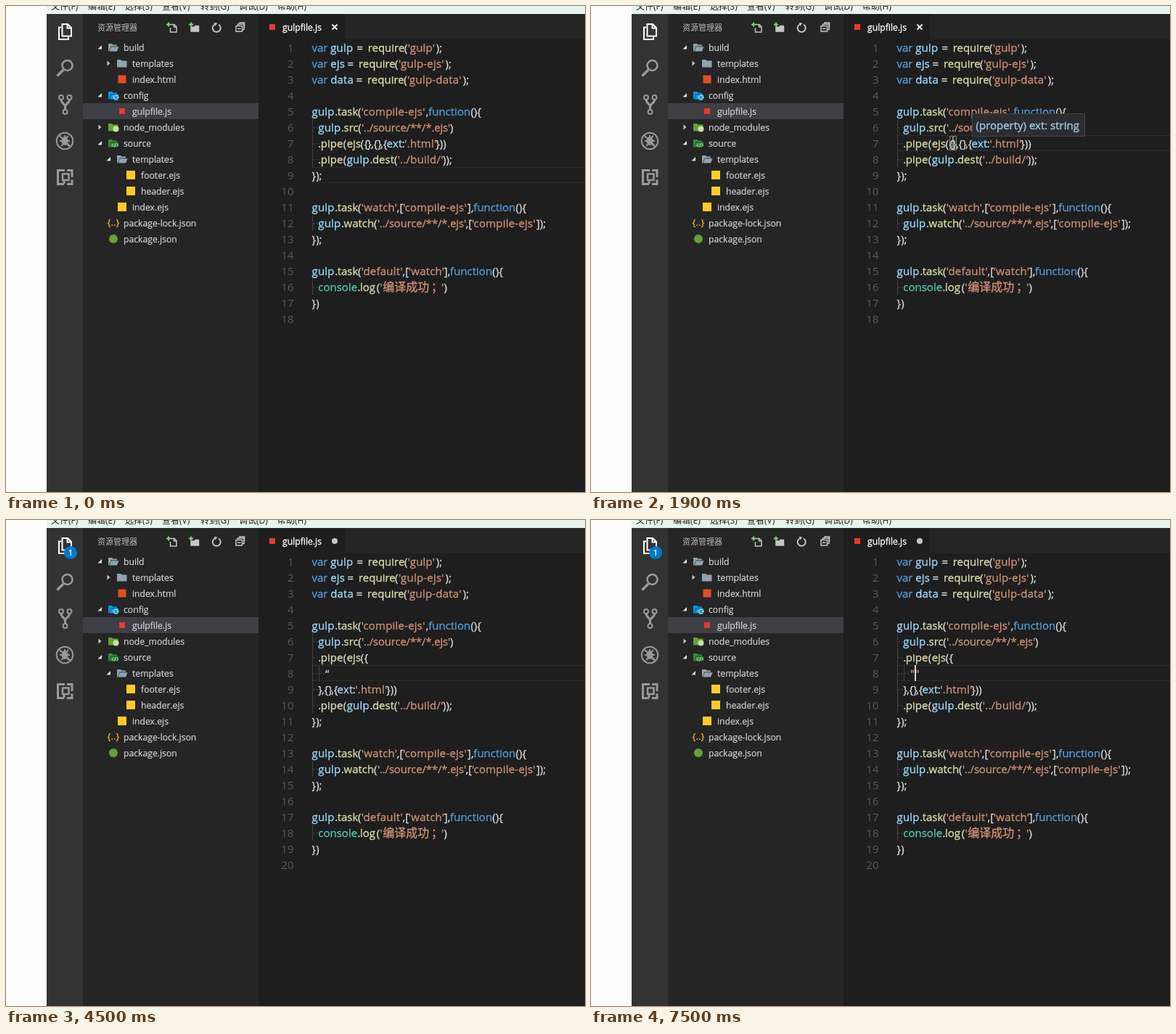
Write an HTML page that moves like this. It is 798 px wide and 670 px high and loops after 8 s.

```html
<!DOCTYPE html>
<html lang="zh-CN">
<head>
<meta charset="utf-8">
<title>Editor</title>
<style>
html, body { margin: 0; width: 100%; height: 100%; overflow: hidden; background: #fdfdfd; }
svg { display: block; font-family: "Open Sans", "Noto Sans CJK SC", "Noto Sans CJK", sans-serif; }
text, tspan { fill: currentColor; stroke: currentColor; stroke-width: .3px; }
.code { font-size: 15px; color: #dadada; }
.k { color: #569cd6; }
.v { color: #9cdcfe; letter-spacing: .2px; }
.f { color: #dcdcaa; }
.s, .g, .z { color: #ce9178; }
.s { letter-spacing: .2px; }
.g { letter-spacing: -.2px; }
.t { color: #4ec9b0; }
.z { font-size: 16px; }
.num { color: #5a5a5a; text-anchor: end; stroke: none; }
.tree { font-size: 12.2px; color: #d4d4d4; }
.tree text { stroke-width: .2px; }
.menu { font-size: 12px; color: #222; }
.menu text, .title { stroke: none; }
.line { fill: none; stroke-width: 2; }

.anim, .before, .after { animation: 8s step-end infinite; }
.before { animation-name: before; }
.after { animation-name: after; }
#highlight { animation-name: highlight; }
#tail { animation-name: tail; }
#options { animation-name: options; }
#brackets { animation-name: brackets; }
#word, #hover { animation-name: hover; }
#badge { animation-name: badge; }
#caret { animation-name: place, blink; }
#open { animation-name: open; }
#close { animation-name: close; }
#pair { animation-name: pair; }
#inner { animation-name: inner; }

@keyframes before { 0% { opacity: 1 } 27.5%, 100% { opacity: 0 } }
@keyframes after { 0% { opacity: 0 } 27.5%, 100% { opacity: 1 } }
@keyframes highlight {
  0% { transform: translateY(222px) }
  6.25% { transform: translateY(178px) }
  27.5%, 100% { transform: translateY(200px) }
}
@keyframes tail { 0% { transform: none } 27.5%, 100% { transform: translateY(44px) } }
@keyframes options { 0% { transform: none } 27.5%, 100% { transform: translate(-68px, 44px) } }
@keyframes brackets { 0%, 27.5%, 100% { opacity: 0 } 7.5% { opacity: 1 } }
@keyframes hover {
  0%, 27.5%, 100% { opacity: 0 }
  15% { opacity: .8 } 16.25% { opacity: .93 } 17.5% { opacity: 1 }
}
@keyframes badge { 0% { opacity: 0 } 30%, 100% { opacity: 1 } }
@keyframes place {
  0% { transform: translate(499px, 178px) }
  27.5%, 60%, 83.75% { transform: translate(440px, 200px) }
  51.25%, 66.25%, 93.75%, 100% { transform: translate(446px, 200px) }
}
@keyframes blink {
  0%, 12.5%, 23.75%, 32.5%, 43.75%, 56.25%, 72.5%, 88.75% { opacity: 0 }
  6.25%, 17.5%, 27.5%, 38.75%, 50%, 60%, 77.5%, 93.75%, 100% { opacity: 1 }
}
@keyframes open { 0%, 60%, 100% { opacity: 0 } 51.25% { opacity: 1 } }
@keyframes close { 0%, 83.75%, 100% { opacity: 0 } 66.25% { opacity: 1 } }
@keyframes pair { 0% { opacity: 0 } 93.75%, 100% { opacity: 1 } }
@keyframes inner {
  0%, 60%, 83.75% { opacity: 0 }
  51.25%, 66.25%, 93.75%, 100% { opacity: 1 }
}
</style>
</head>
<body>
<svg width="798" height="670" viewBox="0 0 798 670">
  <rect width="798" height="670" fill="#fdfdfd"/>
  <rect x="56" width="742" height="11" fill="#e8f4ef"/>
  <g id="menu" class="menu"></g>
  <rect x="56" y="11" width="50" height="659" fill="#333"/>
  <rect x="106" y="11" width="242" height="659" fill="#252526"/>
  <rect x="348" y="11" width="450" height="659" fill="#1e1e1e"/>
  <rect x="467" y="11" width="331" height="35" fill="#252526"/>
  <rect x="106" y="134" width="242" height="22" fill="#3f3f46"/>

  <!-- activity bar -->
  <g class="line" stroke="#fff">
    <path d="M76 29.500H73V46H86V42M77.500 25h7.500l5 5v11.500h-12.500zM84.500 25v5.500h5.500"/>
  </g>
  <g class="line" stroke="#999">
    <circle cx="84.500" cy="82" r="7" stroke-width="2.600"/>
    <path d="M79 88l-8.500 8.500" stroke-width="3.500"/>
    <circle cx="76" cy="126" r="3"/><circle cx="87.500" cy="126" r="3"/><circle cx="81.500" cy="146" r="3"/>
    <path d="M76 129c0 6 5.500 5 5.500 10v4M87.500 129c0 6-6 5-6 10" stroke-width="3"/>
    <circle cx="81" cy="186" r="11.300"/>
    <path d="M73 178l16 16M74 186h14M76 193l3-3M86 179l-3 3M76 181l3 2M84 190l2 3M81 178v3" stroke-width="1.800"/>
    <ellipse cx="81" cy="186" rx="3.500" ry="5" fill="#999"/>
    <path d="M81 226.500H71.500V245.500H80M84 245.500H91V239.500M84 226.500H91V236M80 245v-6" stroke-width="3"/>
    <path d="M78 231.500h8.500v8.500H78z" stroke-width="2.500"/>
  </g>
  <g id="badge" class="anim">
    <circle cx="89" cy="45" r="9" fill="#007acc"/>
    <text x="89" y="49" font-size="10.500" text-anchor="middle" color="#fff">1</text>
  </g>

  <!-- explorer header -->
  <text class="title" x="126" y="34" font-size="11" color="#bbb">资源管理器</text>
  <g class="line" stroke="#c5c5c5" style="stroke-width:1.500">
    <path d="M227 25.500h5l3 3v7.500h-8.500v-6M231.500 25v4h4"/>
    <path d="M255 29h10.500v6H255zM260 27.500h6" fill="#c5c5c5"/>
    <path d="M287.500 25.500a5.500 5.500 0 1 0 5.500 0" stroke-width="2"/>
    <path d="M286.500 23l5 .5-3 4z" fill="#c5c5c5" stroke="none"/>
    <path d="M317 27.500h8.500v7.500H317zM319.500 27v-2h8.500v7.500h-2M322 24.500V23h6.500v7M319 31.300h4.500"/>
    <path d="M221 25.500h6M224 22.500v6M252 25.500h6M255 22.500v6" stroke="#89d185" stroke-width="1.800"/>
  </g>
  <g id="tree" class="tree"></g>

  <!-- tab -->
  <rect x="363" y="25" width="8" height="8" fill="#e53935"/>
  <text x="381" y="34" class="tree" style="color:#fff">gulpfile.js</text>
  <path class="before line" d="M449.500 25.500l7 7m0-7l-7 7" stroke="#e8e8e8"/>
  <circle class="after" cx="453" cy="29" r="4" fill="#c5c5c5"/>

  <!-- editor -->
  <path id="highlight" class="anim" d="M422 .5H798M422 21.500H798" stroke="#2e2e2e" fill="none"/>
  <g id="brackets" class="anim" fill="rgba(0,100,0,.1)" stroke="#888">
    <path d="M494.500 179.500h4v19h-4zM499.500 179.500h4v19h-4z"/>
  </g>
  <rect id="word" class="anim" x="525" y="178" width="21" height="22" fill="#264f78" fill-opacity=".2"/>
  <g class="code">
    <g id="numbers"></g>
    <g id="head"></g>
    <g id="options" class="anim"></g>
    <g id="tail" class="anim"></g>
    <g id="added" class="after"></g>
    <path id="inner" class="anim" d="M431.500 200v22" stroke="#404040"/>
    <text id="open" class="anim" x="440" y="217">“</text>
    <text id="close" class="anim" x="440" y="217">”</text>
    <text id="pair" class="anim s" y="217"><tspan x="440">"</tspan><tspan x="446.500">"</tspan></text>
  </g>
  <g id="hover" class="anim">
    <rect x="525.500" y="148.500" width="155" height="31" fill="#2d2d30" stroke="#454545"/>
    <text x="530.500" y="170" font-size="15" color="#a2cfe6">(property) ext: string</text>
  </g>
  <g id="caret" class="anim"><rect width="2" height="22" fill="#d8d8d8"/></g>
</svg>
<script>
const add = (id, markup) => document.getElementById(id).insertAdjacentHTML('beforeend', markup);
const rowTop = n => 24 + 22 * n;
const baseline = n => rowTop(n) + 17;

// Each token: class letter, optional x, then the text.
const codeLine = (n, source) => `<text y="${baseline(n)}">` + source.split('|').map(token => {
  const [, kind, x, text] = token.match(/^(\w)([\d.]*) (.*)$/);
  return `<tspan class="${kind}"${x && ` x="${x}"`}>${text}</tspan>`;
}).join('') + '</text>';

const indent = (n, spaces = 2) => {
  const y = rowTop(n);
  let marks = `<path d="M422.500 ${y}v22" stroke="#404040"/>`;
  for (let i = 0; i < spaces; i++)
    marks += `<rect x="${423.5 + i * 4.4}" y="${y + 11}" width="1.500" height="1.500" fill="#505050"/>`;
  return marks;
};

const head = {
  1: "k421.5 var|v447.2 gulp|p483.4 =|f498.7 require|p548.9 (|s553.7 'gulp'|p592.8 );",
  2: "k421.5 var|v447.2 ejs|p470.6 =|f486 require|p536.1 (|s541 'gulp-ejs'|p605.5 );",
  3: "k421.5 var|v447.2 data|p482.7 =|f498 require|p548.2 (|s553 'gulp-data'|p629.7 );",
  5: "v421.5 gulp|p453.3 .|f456.7 task|p485 (|s489.8 'compile-ejs'|p578.7 ,|k582.2 function|p640.4 (){",
  6: "v430.3 gulp|p462 .|f465.5 src|p485.3 (|g490 '../source/**/*.ejs'|p612 )",
  7: "p430.3 .|f433.8 pipe|p464.8 (|f469.7 ejs|p488.7 (|p493.5 {"
};
const tail = {
  8: "p430.3 .|f433.8 pipe|p464.8 (|v469.7 gulp|p501.4 .|f504.9 dest|p534.9 (|s539.7 '../build/'|p602 ));",
  9: "p421.5 });",
  11: "v421.5 gulp|p453.3 .|f456.7 task|p485 (|s489.8 'watch'|p538.8 ,[|s547.1 'compile-ejs'|p636 ],|k644.3 function|p702.5 (){",
  12: "v430.3 gulp|p462 .|f465.5 watch|p507.1 (|g511.9 '../source/**/*.ejs'|p633.7 ,[|s642 'compile-ejs'|p730.9 ]);",
  13: "p421.5 });",
  15: "v421.5 gulp|p453.3 .|f456.7 task|p485 (|s489.8 'default'|p546.5 ,[|s554.8 'watch'|p603.8 ],|k612.1 function|p670.3 (){",
  16: "t430.3 console|p484.5 .|f488 log|p510.7 (|s515.5 '|z519.2 编译成功|z586 ；|s600 '|p603.5 )",
  17: "p421.5 })"
};
const block = lines => Object.entries(lines).map(([n, source]) => codeLine(+n, source)).join('');

add('head', block(head) + indent(6) + indent(7));
add('options', codeLine(7, "p498.3 }|p503.2 ,|p506.6 {}|p516.3 ,|p519.8 {|v524.6 ext|p545.8 :|s549.2 '.html'|p592.2 }))"));
add('tail', block(tail) + [8, 12, 16].map(n => indent(n)).join(''));
add('added', indent(8, 4) + indent(9));
for (let n = 1; n <= 20; n++)
  add('numbers', `<g class="${n > 18 ? 'after' : ''}"><text class="num" x="396.500" y="${baseline(n)}">${n}</text></g>`);

['文件(F)', '编辑(E)', '选择(S)', '查看(V)', '转到(G)', '调试(D)', '帮助(H)'].forEach((label, i) =>
  add('menu', `<text x="${62 + i * 51 + Math.max(0, i - 3) * 2}" y="5">${label}</text>`));

const square = (color, size = 12) =>
  `<rect x="${8 - size / 2}" y="${-size / 2}" width="${size}" height="${size}" fill="${color}"/>`;
const closed = color => `<path d="M1-5h5l1.500 1.500H14.500V5.500H1z" fill="${color}"/>`;
const opened = color => `<path d="M1 5.500V-5h5l1.500 1.500H13V-1.500H4.500L2 5.500zM4.800-.8H15.500L13 5.500H2.600z" fill="${color}"/>`;
const icons = {
  open: opened('#90a4ae'),
  closed: closed('#90a4ae'),
  config: opened('#039be5') + '<circle cx="11.500" cy="3" r="3" fill="none" stroke="#b3e5fc" stroke-width="2" stroke-dasharray="1.600 .8"/>',
  modules: closed('#689f38') + '<circle cx="11.500" cy="2.500" r="4" fill="#c5e1a5"/>',
  source: opened('#388e3c') + '<path d="M8 1l-2 2 2 2M13 1l2 2-2 2M11.500 0l-2 6" fill="none" stroke="#a5d6a7"/>',
  html: square('#e44d26', 11),
  task: square('#e53935', 8),
  script: square('#ffca28'),
  json: '<text x="8" y="4" font-size="13" text-anchor="middle" color="#fbc02d">{..}</text>',
  pkg: '<circle cx="8" cy="0" r="6" fill="#689f38"/>'
};
const arrows = {
  v: '<path d="M-8-3v5.500h-5.500z" fill="#e0e0e0"/>',
  '>': '<path d="M-12.500-3.500l4 3.500-4 3.500z" fill="#c5c5c5"/>',
  '-': ''
};

// depth, arrow (v open, > closed, - none), icon, label
[
  [0, 'v', 'open', 'build'],
  [1, '>', 'closed', 'templates'],
  [1, '-', 'html', 'index.html'],
  [0, 'v', 'config', 'config'],
  [1, '-', 'task', 'gulpfile.js'],
  [0, '>', 'modules', 'node_modules'],
  [0, 'v', 'source', 'source'],
  [1, 'v', 'open', 'templates'],
  [2, '-', 'script', 'footer.ejs'],
  [2, '-', 'script', 'header.ejs'],
  [1, '-', 'script', 'index.ejs'],
  [0, '-', 'json', 'package-lock.json'],
  [0, '-', 'pkg', 'package.json']
].forEach(([depth, arrow, icon, label], i) =>
  add('tree', `<g transform="translate(${140 + depth * 12} ${57 + i * 22})">${arrows[arrow]}${icons[icon]}<text x="22" y="5">${label}</text></g>`));
</script>
</body>
</html>
```
